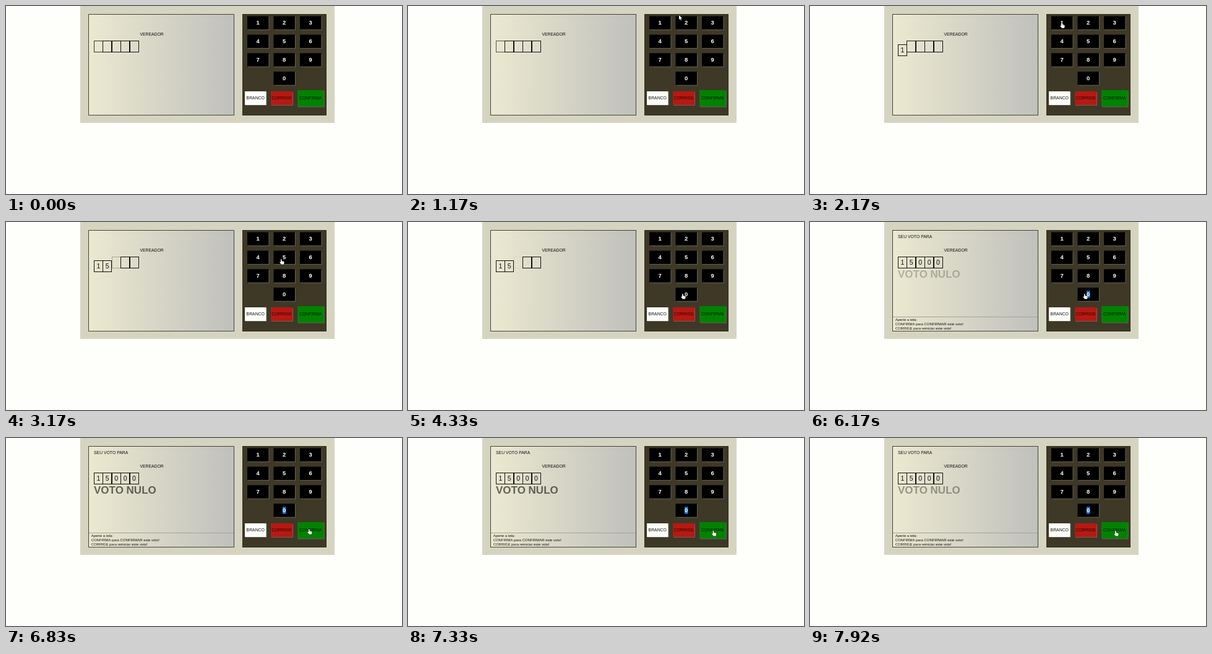
Animation of 640 by 304 pixels, one loop 8 s. Source, as an HTML page with a canvas:

```html
<!DOCTYPE html>
<html lang="pt-BR">
<head>
<meta charset="utf-8">
<title>Urna</title>
<style>
  html, body { margin: 0; width: 100%; height: 100%; overflow: hidden; background: #fefefa; }
  canvas { display: block; }
</style>
</head>
<body>
<canvas id="stage" width="640" height="304"></canvas>
<script>
const ctx = document.getElementById('stage').getContext('2d');
const FONT = '"Liberation Sans", Arial, sans-serif';
const LOOP = 8000, BLINK = 500, SMALL = 6.85;

// Keypad: [label, x, y, width, height, fill, text colour, font size, weight]
const buttons = [...'1234567890'].map((digit, i) => {
  const column = digit === '0' ? 1 : i % 3;
  return [digit, 390 + column * 42.5, 16.5 + Math.floor(i / 3) * 29.9, 34.5, 21.5, '#000', '#fffff8', 9.5, 'bold'];
});
buttons.push(
  ['BRANCO', 386, 138, 34.5, 22, '#fffffc', '#111', SMALL, ''],
  ['CORRIGE', 428, 138, 35, 22, '#b81812', '#260600', SMALL, ''],
  ['CONFIRMA', 471, 136, 42.5, 26.5, '#008200', '#001c00', SMALL, '']
);

const presses = [[2000, '1'], [2815, '5'], [4500, '0'], [4810, '0'], [5110, '0']];
const SELECTED = presses[3][0], DONE = presses[4][0];
const BLINK_START = -130;

// Pointer stops: [time, x, y]
const pointerPath = [
  [80, 96, 150], [830, 437, 8], [1170, 438, 15], [1700, 406, 27], [2160, 406, 27],
  [2700, 444, 60], [3420, 444, 60], [3900, 443, 116], [6340, 443, 116],
  [6880, 490, 148], [7050, 490, 148], [7400, 493, 150], [LOOP, 493, 150]
];

// cubic-bezier(.25, .1, .25, 1)
function ease(x) {
  const bezier = (a, b, s) => 3 * a * s * (1 - s) ** 2 + 3 * b * s * s * (1 - s) + s ** 3;
  let low = 0, high = 1;
  for (let i = 0; i < 16; i++) {
    const mid = (low + high) / 2;
    if (bezier(.25, .25, mid) < x) low = mid; else high = mid;
  }
  return bezier(.1, 1, low);
}

function blink(elapsed) {
  const phase = (elapsed % BLINK) / BLINK * 2;
  return phase < 1 ? ease(phase) : 1 - ease(phase - 1);
}

function rect(x, y, w, h, fill) {
  ctx.fillStyle = fill;
  ctx.fillRect(x, y, w, h);
}

function outline(x, y, w, h, color) {
  ctx.strokeStyle = color;
  ctx.lineWidth = 1;
  ctx.strokeRect(x + .5, y + .5, w - 1, h - 1);
}

function text(label, x, y, size = SMALL, color = '#111', align = 'left', weight = '') {
  ctx.font = `${weight} ${size}px ${FONT}`;
  ctx.textAlign = align;
  ctx.fillStyle = color;
  ctx.fillText(label, x, y);
}

function withAlpha(alpha, draw) {
  ctx.globalAlpha = alpha;
  draw();
  ctx.globalAlpha = 1;
}

function drawKeypad(t) {
  rect(382, 13, 136, 164, '#3e3826');
  outline(382, 13, 136, 164, '#332c1c');
  for (const [label, x, y, w, h, fill, color, size, weight] of buttons) {
    rect(x + 1, y + 1, w, h, '#66645a');
    rect(x, y, w, h, fill);
    const middle = x + w / 2, baseline = Math.floor(y + h / 2 + size * .36);
    if (label === '0' && t >= SELECTED) rect(middle - 2.8, y + 5, 5.6, 11.5, '#1478d4');
    text(label, middle, baseline, size, color, 'center', weight);
  }
}

function drawDigits(t) {
  const typed = presses.filter(([time]) => t >= time).length;
  const blinkStart = typed ? presses[typed - 1][0] : BLINK_START;
  presses.forEach(([, digit], i) => {
    const filled = i < typed;
    const x = 142 + i * 14.4;
    const y = filled && typed < presses.length ? 62 : 56;
    withAlpha(i === typed ? blink(t - blinkStart) : 1, () => {
      outline(Math.round(x), y, 15, 19, '#111');
      if (filled) text(digit, x + 7.4, y + 13.3, 10.6, '#111', 'center');
    });
  });
}

function drawScreen(t) {
  const shade = ctx.createLinearGradient(133, 0, 369, 0);
  shade.addColorStop(0, '#ebe9d0');
  shade.addColorStop(1, '#c0c0bc');
  rect(133, 13, 236, 164, shade);
  outline(133, 13, 236, 164, '#45443a');
  text('VEREADOR', 216.4, 48);
  drawDigits(t);
  if (t < DONE) return;
  text('SEU VOTO PARA', 142, 26.3);
  withAlpha(.58 * blink(t - DONE), () => text('VOTO NULO', 142, 89.8, 17, '#000', 'left', 'bold'));
  rect(134, 153, 234, 1, '#a3a298');
  ['Aperte a tela:', 'CONFIRMA para CONFIRMAR este voto!', 'CORRIGE para reiniciar este voto!']
    .forEach((line, i) => text(line, 137.7, 160 + i * 7, 5.95));
}

const arrow = new Path2D('M0 0V7L1.7 5.5L2.8 8L4 7.5L2.9 5.1H5Z');
const hand = new Path2D('M0 .7Q.8 -.6 1.6 .7V3.2L5 3.9Q5.8 4.2 5.6 5.3L4.9 8.6H1L-1.6 5.4Q-1.6 4.2 -.6 4.7L0 5.2Z');

function drawPointer(t) {
  if (t < pointerPath[0][0]) return;
  const next = Math.max(1, pointerPath.findIndex(([time]) => time >= t));
  const [t0, x0, y0] = pointerPath[next - 1], [t1, x1, y1] = pointerPath[next];
  const u = (t - t0) / (t1 - t0), s = u * u * (3 - 2 * u);
  const px = x0 + (x1 - x0) * s, py = y0 + (y1 - y0) * s;
  const over = buttons.some(([, x, y, w, h]) => px >= x && px <= x + w && py >= y && py <= y + h);
  const shape = over ? hand : arrow;
  ctx.save();
  ctx.translate(px, py);
  ctx.lineWidth = .8;
  ctx.strokeStyle = '#111';
  ctx.stroke(shape);
  ctx.fillStyle = '#fffffa';
  ctx.fill(shape);
  ctx.restore();
}

const start = performance.now();

function render() {
  const t = (performance.now() - start) % LOOP;
  rect(0, 0, 640, 304, '#fefefa');
  rect(120, 0, 411, 189, '#d5d4c0');
  drawScreen(t);
  drawKeypad(t);
  drawPointer(t);
  requestAnimationFrame(render);
}

render();
</script>
</body>
</html>
```
